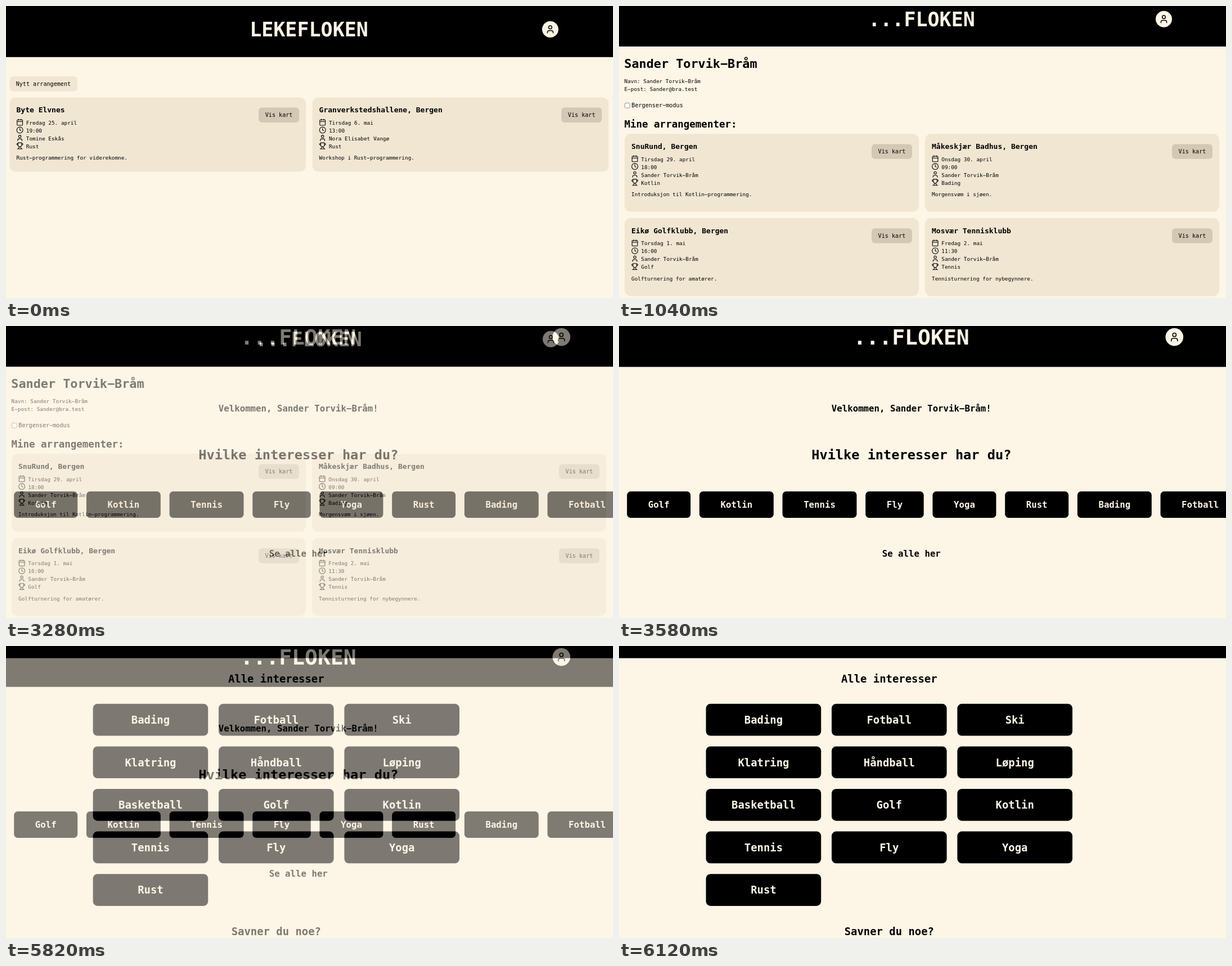
Animation, 1079 px wide and 519 px high, one loop 8 s. Source, as an HTML page:

```html
<!DOCTYPE html>
<html lang="no">
<head>
<meta charset="utf-8">
<title>Arrangementer</title>
<style>
  html, body { margin: 0; width: 100%; height: 100%; overflow: hidden; background: #fdf5e6; }
  svg { display: block; width: 1079px; height: 519px; }
  text { font-family: "DejaVu Sans Mono", monospace; white-space: pre; }
</style>
</head>
<body>
<svg id="stage" viewBox="0 0 1079 519" xmlns="http://www.w3.org/2000/svg"></svg>
<script>
const CREAM = '#fdf5e6', CARD = '#f1e6d2', BUTTON = '#d3c8b4', INK = '#000';
const LOOP = 8000, STEP = 60, STEPS = 10;
const FADE_STARTS = [500, 3040, 5580];
const USER = 'Sander Torvik-Bråm';

const ICONS = {
  calendar: '<rect x="3" y="4" width="18" height="18" rx="2"/><path d="M16 2v4M8 2v4M3 10h18"/>',
  clock: '<circle cx="12" cy="12" r="10"/><path d="M12 6v6l4 2"/>',
  user: '<circle cx="12" cy="7" r="4"/><path d="M19 21v-2a4 4 0 0 0-4-4H9a4 4 0 0 0-4 4v2"/>',
  trophy: '<path d="M6 9H4.5a2.5 2.5 0 0 1 0-5H6M18 9h1.5a2.5 2.5 0 0 0 0-5H18M4 22h16' +
    'M10 14.66V17c0 .55-.47.98-.97 1.21C7.85 18.75 7 20.24 7 22' +
    'M14 14.66V17c0 .55.47.98.97 1.21C16.15 18.75 17 20.24 17 22M18 2H6v7a6 6 0 0 0 12 0V2Z"/>'
};

const rect = (x, y, w, h, fill, r = 0, extra = '') =>
  `<rect x="${x}" y="${y}" width="${w}" height="${h}" rx="${r}" fill="${fill}" ${extra}/>`;

// The long minus glyph gives the wide hyphen of the design.
function text(str, x, y, size, { bold, center, fill = INK } = {}) {
  return `<text x="${x}" y="${y}" font-size="${size}" fill="${fill}"` +
    ` font-weight="${bold ? 700 : 400}" text-anchor="${center ? 'middle' : 'start'}">` +
    `${str.replace(/-/g, '\u2212')}</text>`;
}

const heading = (str, x, y, size, fill) => text(str, x, y, size, { bold: true, center: true, fill });

function icon(name, cx, cy, size) {
  const k = size / 24;
  return `<g transform="translate(${cx - size / 2} ${cy - size / 2}) scale(${k})" fill="none"` +
    ` stroke="#000" stroke-width="2" stroke-linecap="round" stroke-linejoin="round">${ICONS[name]}</g>`;
}

function header(height, title, cx, baseline, size, avatarX, avatarY, radius) {
  return rect(0, 0, 1079, height, INK) +
    heading(title, cx, baseline, size, CREAM) +
    `<circle cx="${avatarX}" cy="${avatarY}" r="${radius}" fill="${CREAM}"/>` +
    icon('user', avatarX, avatarY, radius * 1.19);
}

function card(x, y, w, h, [title, date, time, host, topic, note]) {
  const rows = [['calendar', date], ['clock', time], ['user', host], ['trophy', topic]];
  const buttonX = x + w - 84;
  return rect(x, y, w, h, CARD, 11) +
    text(title, x + 12, y + 26.8, 13, { bold: true }) +
    rows.map(([name, label], i) =>
      icon(name, x + 18.1, y + 44 + 14 * i, 13) +
      text(label, x + 29.3, y + 48.3 + 14 * i, 9.38)).join('') +
    text(note, x + 12, y + 110.4, 9.38) +
    rect(buttonX, y + 18.1, 72, 26.3, BUTTON, 6) +
    text('Vis kart', buttonX + 36, y + 34.4, 10.15, { center: true });
}

function eventsPage() {
  return header(90.8, 'LEKEFLOKEN', 538.5, 54, 35, 967.5, 41.5, 14.5) +
    rect(6.5, 125, 120.5, 26.7, CARD, 7) +
    text('Nytt arrangement', 66.4, 141.5, 10.15, { center: true }) +
    card(6.5, 162.5, 526.6, 132, ['Byte Elvnes', 'Fredag 25. april', '19:00',
      'Tomine Eskås', 'Rust', 'Rust-programmering for viderekomne.']) +
    card(544.6, 162.5, 526.6, 132, ['Granverkstedshallene, Bergen', 'Tirsdag 6. mai', '13:00',
      'Nora Elisabet Vangø', 'Rust', 'Workshop i Rust-programmering.']);
}

function profilePage() {
  const events = [
    ['SnuRund, Bergen', 'Tirsdag 29. april', '18:00', USER, 'Kotlin', 'Introduksjon til Kotlin-programmering.'],
    ['Måkeskjær Badhus, Bergen', 'Onsdag 30. april', '09:00', USER, 'Bading', 'Morgensvøm i sjøen.'],
    ['Eikø Golfklubb, Bergen', 'Torsdag 1. mai', '16:00', USER, 'Golf', 'Golfturnering for amatører.'],
    ['Mosvær Tennisklubb', 'Fredag 2. mai', '11:30', USER, 'Tennis', 'Tennisturnering for nybegynnere.']
  ];
  return header(72, '...FLOKEN', 538, 35.6, 35, 968.5, 23.3, 14.5) +
    text(USER, 9.3, 110.2, 21.8, { bold: true }) +
    text('Navn: ' + USER, 9.5, 137.3, 9.38) +
    text('E-post: Sander@bra.test', 9.5, 151.3, 9.38) +
    rect(10.4, 172.4, 8.8, 8.8, '#fff', 1.8, 'stroke="#767676" stroke-width=".8"') +
    text('Bergenser-modus', 22.3, 180.3, 10.15) +
    text('Mine arrangementer:', 9.4, 216.3, 17.5, { bold: true }) +
    events.map((event, i) =>
      card(10 + 534 * (i % 2), 227.3 + 149.8 * (i >> 1), 523, 138.3, event)).join('');
}

function welcomePage() {
  const size = 15.73, advance = 9.47;
  let x = 14.2, buttons = '';
  for (const name of ['Golf', 'Kotlin', 'Tennis', 'Fly', 'Yoga', 'Rust', 'Bading', 'Fotball']) {
    const width = name.length * advance + 75.1;
    buttons += rect(x, 294, width, 47, INK, 6.5) + heading(name, x + width / 2, 323.3, size, CREAM);
    x += width + size;
  }
  return header(72.7, '...FLOKEN', 519.6, 33.3, 38.1, 987.3, 19.6, 15.8) +
    heading(`Velkommen, ${USER}!`, 519.8, 152.4, size) +
    heading('Hvilke interesser har du?', 519.8, 236.7, 23.6) +
    buttons +
    heading('Se alle her', 519.8, 409.7, size);
}

function interestsPage() {
  const names = ['Bading', 'Fotball', 'Ski', 'Klatring', 'Håndball', 'Løping', 'Basketball',
    'Golf', 'Kotlin', 'Tennis', 'Fly', 'Yoga', 'Rust'];
  const tiles = names.map((name, i) => {
    const x = 154.6 + 223.4 * (i % 3), y = 102.8 + 75.6 * Math.floor(i / 3);
    return rect(x, y, 204.6, 56.7, INK, 8) + heading(name, x + 102.3, y + 35.2, 18.9, CREAM);
  }).join('');
  return rect(0, 0, 1079, 21.6, INK) +
    heading('Alle interesser', 480.3, 64.6, 18.9) +
    tiles +
    heading('Savner du noe?', 480.3, 514.4, 18.9);
}

const stage = document.getElementById('stage');
stage.innerHTML = [eventsPage, profilePage, welcomePage, interestsPage]
  .map(page => `<g>${rect(0, 0, 1079, 519, CREAM)}${page()}</g>`).join('');
const pages = [...stage.children];

// Each page fades in over the one before it, in ten even steps.
function render(time) {
  FADE_STARTS.forEach((start, i) => {
    const step = Math.floor((time - start) / STEP) + 1;
    const opacity = Math.min(Math.max(step / STEPS, 0), 1);
    pages[i + 1].setAttribute('opacity', opacity);
    pages[i + 1].setAttribute('display', opacity ? 'inline' : 'none');
  });
}

const startTime = performance.now();
function tick() {
  render((performance.now() - startTime) % LOOP);
  requestAnimationFrame(tick);
}
tick();
</script>
</body>
</html>
```
